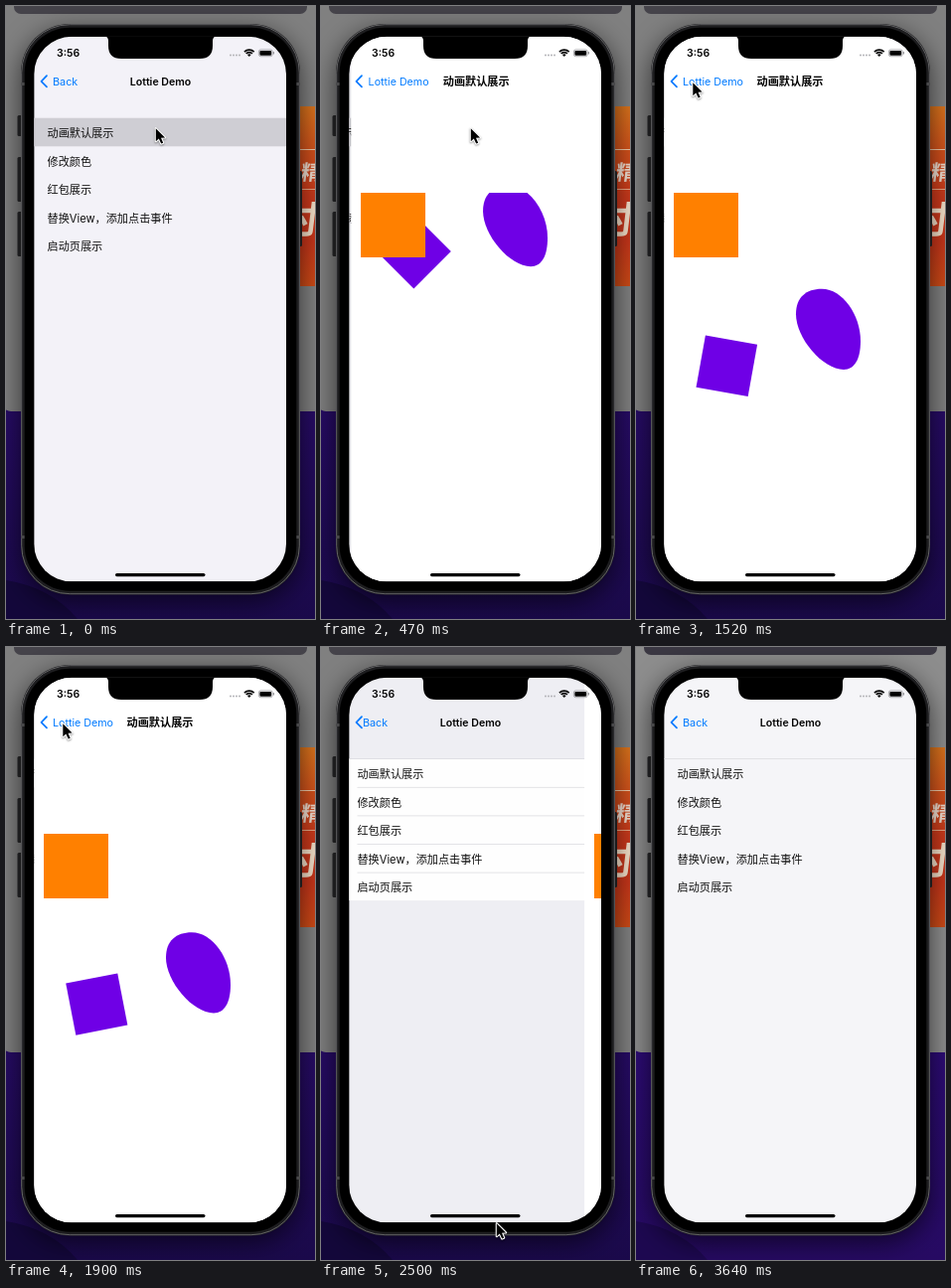
An HTML page with a canvas that plays this animation: 311x617 px, repeating every 3740 ms.

```html
<!DOCTYPE html>
<html lang="zh">
<head>
<meta charset="utf-8">
<title>Lottie Demo</title>
<style>
html, body { margin: 0; width: 100%; height: 100%; overflow: hidden; background: #000; }
canvas { display: block; width: 311px; height: 617px; }
</style>
</head>
<body>
<canvas id="stage"></canvas>
<script>
const W = 311, H = 617, LOOP = 3740;
const canvas = document.getElementById('stage');
const dpr = window.devicePixelRatio || 1;
canvas.width = W * dpr;
canvas.height = H * dpr;
const ctx = canvas.getContext('2d');
ctx.scale(dpr, dpr);

const FONT = 'Inter, "Noto Sans CJK SC", "Noto Sans CJK", sans-serif';
const BLUE = '#007aff', ORANGE = '#ff8000', PURPLE = '#6f00e6';
const SCREEN = { x: 28.2, y: 30.8, w: 253.8, h: 548.5 };
const ROW_TOP = 112.7, ROW_H = 28.6;
const ROWS = ['动画默认展示', '修改颜色', '红包展示', '替换View，添加点击事件', '启动页展示'];
const PUSH = 150, PLAY = 680, POP = 2257, SETTLED = 3640;

const TICKS = [0, 150, 230, 310, 390, 470, 530, 590,
  680, 730, 780, 830, 880, 930, 980, 1020, 1080, 1120, 1170,
  1230, 1270, 1310, 1350, 1390, 1430, 1470, 1520, 1580, 1610, 1640, 1670, 1700, 1730,
  1780, 1830, 1880, 1930, 1980, 2030, 2080, 2130, 2170, 2230, 2260, 2290,
  2380, 2500, 2610, 2700, 2880, 3640];

// time, x, y
const CURSOR = [[0, 150, 122], [640, 150, 122], [1020, 94, 136], [1250, 56.5, 76],
  [2260, 56.5, 76], [2500, 176, 579], [2610, 192, 630], [LOOP, 192, 630]];

const clamp = v => Math.max(0, Math.min(1, v));
const mix = (a, b, k) => a + (b - a) * k;
const spring = x => x <= 0 ? 0 : 1 - (1 + x) * Math.exp(-x);

function rect(x, y, w, h, color) {
  ctx.fillStyle = color;
  ctx.fillRect(x, y, w, h);
}

function round(x, y, w, h, r, color) {
  ctx.beginPath();
  ctx.roundRect(x, y, w, h, r);
  if (color) {
    ctx.fillStyle = color;
    ctx.fill();
  }
}

function fade(y0, y1, ...colors) {
  const g = ctx.createLinearGradient(0, y0, 0, y1);
  colors.forEach((c, i) => g.addColorStop(i / (colors.length - 1), c));
  return g;
}

function text(str, x, y, size, o = {}) {
  ctx.save();
  ctx.globalAlpha = o.alpha ?? 1;
  ctx.font = `${o.weight || 400} ${size}px ${FONT}`;
  ctx.textAlign = o.align || 'left';
  ctx.fillStyle = o.color || '#000';
  ctx.fillText(str, x, y);
  ctx.restore();
}

function backdrop(settled) {
  rect(0, 0, W, H, settled ? fade(408, H, '#2c0b74', '#260a62') : fade(408, H, '#260b64', '#1a094a'));
  ctx.beginPath();
  ctx.moveTo(0, 578);
  ctx.quadraticCurveTo(45, 585, 72, H);
  ctx.lineTo(0, H);
  ctx.fillStyle = settled ? '#1d0850' : '#13073a';
  ctx.fill();
  round(-4, -10, 330, 418, 9, settled ? '#8d8d8d' : '#808080');
  round(8, -10, 295, 18, 7, settled ? '#3a3742' : '#45434a');
  banner();
}

function banner() {
  rect(285, 101, 26, 181, fade(101, 282, '#d9731c', '#d0501b', '#c8381b', '#c5351a', '#cc4a16'));
  rect(285, 144, 26, 1, '#f0c9a8');
  rect(285, 184, 26, 1, '#e9a785');
  ctx.save();
  ctx.transform(1, 0, -0.12, 1, 20, 0);
  text('精', 297, 175, 21, { weight: 700, color: '#f1ded0' });
  text('时', 283, 229, 38, { weight: 700, color: '#f3dfc8' });
  ctx.restore();
}

function phone() {
  const edge = '#262628';
  for (const [y, h] of [[110, 21], [152, 45], [207, 45]]) round(11.5, y, 5, h, 1.5, edge);
  round(293, 166, 5, 76, 1.5, edge);
  ctx.save();
  ctx.shadowColor = 'rgba(0,0,0,.6)';
  ctx.shadowBlur = 26 * dpr;
  ctx.shadowOffsetY = 7 * dpr;
  round(15, 18, 281, 574.5, 49, '#1d1d1f');
  ctx.restore();
  round(15.7, 18.7, 279.6, 573, 48.5);
  ctx.strokeStyle = '#626264';
  ctx.lineWidth = 1;
  ctx.stroke();
  for (const y of [77, 533]) {
    rect(15, y, 4, 3, '#48484a');
    rect(292, y, 4, 3, '#48484a');
  }
  round(18.7, 21.7, 273.6, 567, 45.5, '#000');
}

function list(e, mode) {
  const dx = -76 * e;
  const white = mode === 'back', pressed = mode === 'pressed';
  rect(SCREEN.x, SCREEN.y, SCREEN.w, SCREEN.h,
    white ? '#efeff4' : pressed ? '#f3f2f8' : '#f5f5f8');
  if (white) rect(SCREEN.x, ROW_TOP, SCREEN.w, ROW_H * 5 - 0.6, '#fff');
  if (pressed) rect(SCREEN.x, ROW_TOP, SCREEN.w, ROW_H, '#cfced4');
  else rect(SCREEN.x, 112.2, SCREEN.w, 0.7, '#d9d9dd');
  ROWS.forEach((label, i) => {
    const y = ROW_TOP + i * ROW_H;
    if (white && i) rect(41.5 + dx, y - 0.4, SCREEN.w, 0.8, '#dedee2');
    text(label, 41.5 + dx, y + 19.2, 11.15, { color: '#101010' });
  });
  text('Back', 47 + dx, 79.8, 10.8, { color: BLUE, alpha: 1 - clamp(e * 2 - 0.2) });
  text('Lottie Demo', 155.5 + dx, 79.8, 10.6,
    { weight: 600, align: 'center', alpha: 1 - clamp(e * 1.5 - 0.1) });
  rect(SCREEN.x, SCREEN.y, SCREEN.w, SCREEN.h, `rgba(0,0,0,${0.05 * e})`);
}

function egg(bottom) {
  ctx.save();
  ctx.translate(0, bottom - 286);
  ctx.beginPath();
  ctx.moveTo(187, 204.5);
  ctx.bezierCurveTo(208, 204.5, 226, 231, 226, 257);
  ctx.bezierCurveTo(226, 275, 220, 285.7, 209, 285.7);
  ctx.bezierCurveTo(188, 285.7, 161, 254, 161, 230);
  ctx.bezierCurveTo(161, 213, 171, 204.5, 187, 204.5);
  ctx.fillStyle = PURPLE;
  ctx.fill();
  ctx.restore();
}

function page(e, t) {
  const off = SCREEN.w * (1 - e);
  const q = clamp(0.1158 * Math.pow(Math.max(0, t - PLAY) / 340, 4 / 3));
  const v = 1 - Math.abs(1 - 2 * q);
  ctx.save();
  ctx.translate(off, 0);
  rect(SCREEN.x, SCREEN.y, SCREEN.w, SCREEN.h, '#fff');
  ctx.beginPath();
  ctx.rect(SCREEN.x, 188, SCREEN.w, 300);
  ctx.clip();
  egg(262.5 + 142.3 * Math.pow(v, q < 0.5 ? 1.23 : 1.04));
  ctx.save();
  ctx.translate(91.3, 247 + 149 * v);
  ctx.rotate((45 - 90 * q) * Math.PI / 180);
  rect(-26.5, -26.5, 53, 53, PURPLE);
  ctx.restore();
  rect(38, 188, 65, 65, ORANGE);
  ctx.restore();

  const alpha = clamp(e * 1.6 - 0.6);
  text('Lottie Demo', 47 + 77 * (1 - e), 79.8, 10.7, { color: BLUE, alpha });
  text(ROWS[0], 155 + off * 0.6, 80, 11.15, { weight: 700, align: 'center', alpha });
}

function chrome() {
  ctx.beginPath();
  ctx.moveTo(41, 70.2);
  ctx.lineTo(35.5, 75.8);
  ctx.lineTo(41, 81.4);
  ctx.strokeStyle = BLUE;
  ctx.lineWidth = 1.7;
  ctx.lineCap = ctx.lineJoin = 'round';
  ctx.stroke();

  ctx.beginPath();
  ctx.moveTo(99, 30);
  ctx.quadraticCurveTo(103, 31, 103, 35);
  ctx.lineTo(103, 40);
  ctx.quadraticCurveTo(103, 53, 116, 53);
  ctx.lineTo(195, 53);
  ctx.quadraticCurveTo(208, 53, 208, 40);
  ctx.lineTo(208, 35);
  ctx.quadraticCurveTo(208, 31, 212, 30);
  ctx.fillStyle = '#000';
  ctx.fill();

  text('3:56', 51, 51, 10.5, { weight: 600 });
  for (let i = 0; i < 4; i++) round(225 + i * 3, 48.6, 2, 2, 1, '#b4b4b8');
  wifi(244.8, 51);
  round(254.4, 43.9, 13.8, 6.8, 2);
  ctx.strokeStyle = '#8a8a8e';
  ctx.lineWidth = 0.7;
  ctx.stroke();
  round(255.4, 44.9, 11.8, 4.8, 1.2, '#000');
  round(268.9, 46.1, 1, 2.4, 0.5, '#8a8a8e');
  round(110, 571, 90.5, 3.2, 1.6, '#000');
}

function wifi(x, y) {
  const a = -Math.PI * 0.75, b = -Math.PI * 0.25;
  ctx.lineCap = 'butt';
  ctx.strokeStyle = ctx.fillStyle = '#000';
  ctx.lineWidth = 1.6;
  for (const r of [4.4, 6.9]) {
    ctx.beginPath();
    ctx.arc(x, y, r, a, b);
    ctx.stroke();
  }
  ctx.beginPath();
  ctx.moveTo(x, y);
  ctx.arc(x, y, 2.7, a, b);
  ctx.fill();
}

function cursor(t) {
  const i = CURSOR.findIndex(k => k[0] > t);
  const [t0, x0, y0] = CURSOR[i - 1], [t1, x1, y1] = CURSOR[i];
  const k = (t - t0) / (t1 - t0);
  ctx.save();
  ctx.translate(mix(x0, x1, k), mix(y0, y1, k));
  ctx.beginPath();
  [[0.8, 1.2], [0.8, 14.2], [3.8, 11.4], [6.2, 16.6], [8.2, 15.7], [6, 10.7], [10.1, 10.5]]
    .forEach(p => ctx.lineTo(...p));
  ctx.closePath();
  ctx.lineJoin = 'round';
  ctx.strokeStyle = '#fff';
  ctx.lineWidth = 2.2;
  ctx.shadowColor = 'rgba(0,0,0,.4)';
  ctx.shadowBlur = 2 * dpr;
  ctx.shadowOffsetY = dpr;
  ctx.stroke();
  ctx.shadowColor = 'transparent';
  ctx.fillStyle = '#000';
  ctx.fill();
  ctx.restore();
}

function draw(t) {
  const popping = t >= POP;
  let e = popping ? 1 - spring((t - POP) * 0.0181) : spring((t - PUSH) * 0.0215);
  if (e < 0.002) e = 0;
  if (e > 0.995) e = 1;
  const settled = t >= SETTLED;
  ctx.clearRect(0, 0, W, H);
  backdrop(settled);
  phone();
  ctx.save();
  round(SCREEN.x, SCREEN.y, SCREEN.w, SCREEN.h, 38);
  ctx.clip();
  list(e, settled ? 'settled' : popping ? 'back' : 'pressed');
  if (e > 0) page(e, t);
  chrome();
  ctx.restore();
  if (!settled) cursor(t);
}

const start = performance.now();
function loop() {
  const now = (performance.now() - start) % LOOP;
  draw(TICKS.findLast(k => k <= now) ?? 0);
  requestAnimationFrame(loop);
}
loop();
</script>
</body>
</html>
```
